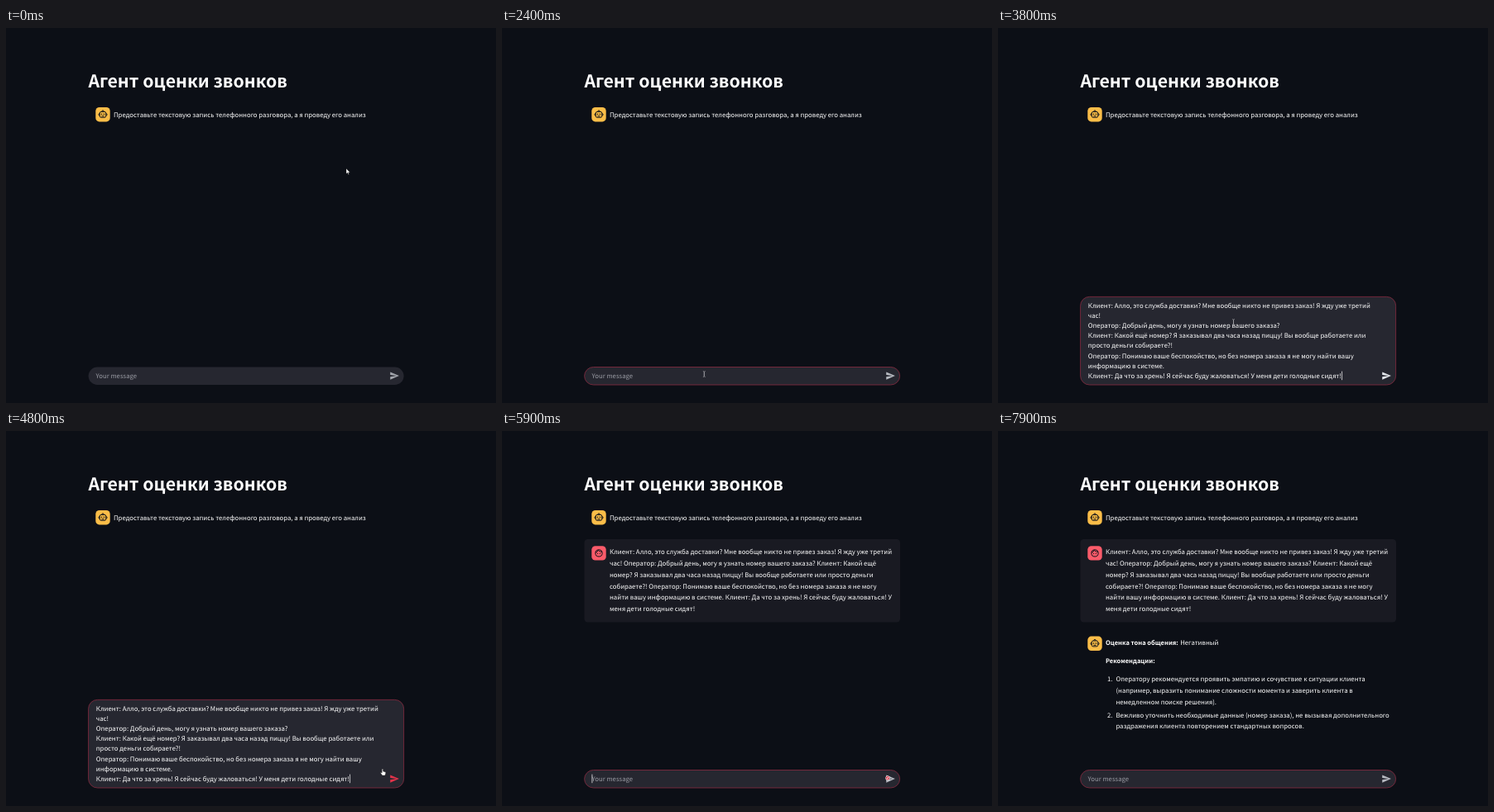
Write an HTML page that moves like this. It is 592 px wide and 454 px high and loops after 8 s.

```html
<!DOCTYPE html>
<html lang="ru">
<head>
<meta charset="utf-8">
<title>Агент оценки звонков</title>
<style>
  html, body { margin: 0; width: 100%; height: 100%; overflow: hidden; background: #0c0f16; }
  svg { display: block; width: 592px; height: 454px; }
  text { fill: #fff; text-rendering: geometricPrecision; white-space: pre; }
  .bold { font-weight: 600; }
</style>
</head>
<body>
<svg id="stage" viewBox="0 0 592 454">
  <defs>
    <g id="bot">
      <rect width="17.4" height="17.4" rx="4.4" fill="#fbbd48"/>
      <g fill="none" stroke="#11131a" stroke-width="1">
        <rect x="5" y="5.4" width="7.4" height="6.9" rx="1.6"/>
        <path d="M7.4 5.2a1.3 1.3 0 0 1 2.6 0M4.8 7.6a1.2 1.2 0 0 0 0 2.4M12.6 7.6a1.2 1.2 0 0 1 0 2.4M7 10.7h3.4"/>
      </g>
      <circle cx="7.3" cy="8.3" r=".75"/><circle cx="10.1" cy="8.3" r=".75"/>
    </g>
    <g id="face">
      <rect width="17.4" height="17.4" rx="4.4" fill="#fa5b6a"/>
      <g fill="none" stroke="#11131a" stroke-width="1">
        <circle cx="8.7" cy="8.7" r="4.1"/>
        <path d="M4.8 8.2Q7.3 7.3 8 4.9Q9.6 7.6 12.5 7.2"/>
      </g>
      <circle cx="7.3" cy="9.3" r=".6"/><circle cx="10.1" cy="9.3" r=".6"/>
    </g>
  </defs>

  <rect width="592" height="454" fill="#0c0f16"/>
  <text id="title" x="99.5" y="72.4" font-weight="700">Агент оценки звонков</text>
  <use href="#bot" x="108.3" y="96"/>
  <g id="hello"></g>

  <g id="request">
    <rect x="99.5" y="131" width="381.5" height="100.5" rx="4.2" fill="#191a22"/>
    <use href="#face" x="108.3" y="139.2"/>
  </g>

  <g id="wait">
    <circle cx="104" cy="247" r="3.7" fill="none" stroke="#2b2d36" stroke-width="1"/>
    <path id="spin" d="M106.6 244.4A3.7 3.7 0 1 1 101.4 244.4" fill="none" stroke="#d3d4d8" stroke-width="1"/>
    <circle cx="170.2" cy="246.8" r="4.2" fill="#f9c23c"/>
    <path d="M167.3 244.3l2-.6M171.3 243.7q1.3-.6 2.1.4M169.2 249.1l2.4-.6" fill="none" stroke="#5c3a1c" stroke-width=".7"/>
    <circle cx="168.6" cy="245.8" r=".65" fill="#4a2d1a"/><circle cx="172.2" cy="245.8" r=".65" fill="#4a2d1a"/>
    <path d="M166 248.2q1 0 1.3 1.2l2.8-.4q.7.5-.3.9l-1 .5q-.3 1.4-1.7 1.3q-1.6-.6-1.1-3.5z" fill="#e58b2b"/>
  </g>

  <g id="answer"><use href="#bot" x="108.3" y="248.6"/></g>

  <rect id="box" x="99.6" width="381" rx="10.9" fill="#262730" stroke="#7c2a3e" stroke-width=".9"/>
  <g id="draft"></g>
  <text id="hint" x="108.6" y="423.6" style="fill:#9a9ca4">Your message</text>
  <rect id="caret" y="415.6" width=".8" height="10.6" fill="#e3e3e6"/>
  <path id="send" d="M2 21L23 12 2 3v7l15 2-15 2z" transform="translate(463.2 415) scale(.51)"/>

  <g id="cursor">
    <path id="arrow" d="M0 0V6.6L1.6 5.2 2.6 7.5 3.6 7 2.6 4.9H4.7Z" fill="#fff" stroke="#000" stroke-width=".4"/>
    <path id="beam" d="M-1.4 -3.4Q0 -3.4 0 -2.4V2.4Q0 3.4 -1.4 3.4M1.4 -3.4Q0 -3.4 0 -2.4V2.4Q0 3.4 1.4 3.4" fill="none" stroke="#a6a6ab" stroke-width=".7"/>
    <path id="hand" d="M-.8 -2.6q.8-.8 1.4 0V0l2.6.8q.8.4.5 1.6L3 5H-.4L-2.6 1.8q.2-1 1.2-.4l.6.6z" fill="#fff" stroke="#111" stroke-width=".4"/>
    <g id="stop">
      <circle r="2.6" fill="#fff"/>
      <circle r="1.8" fill="#fff" stroke="#d42b40" stroke-width="1"/>
      <path d="M-1.3 -1.3L1.3 1.3" stroke="#d42b40" stroke-width="1"/>
    </g>
  </g>
</svg>
<script>
const $ = id => document.getElementById(id);
const LOOP = 8000, FRAME = 100;
const GREETING = 'Предоставьте текстовую запись телефонного разговора, а я проведу его анализ';
const LABEL = 'Оценка тона общения:';
const NARROW = '"Noto Sans CJK JP", "Noto Sans CJK SC", "Open Sans", sans-serif';
const PLAIN = '"Open Sans", "Noto Sans", sans-serif';

const pen = document.createElement('canvas').getContext('2d');
function measure(str, weight, family) {
  pen.font = `${weight} 100px ${family}`;
  return pen.measureText(str).width;
}
// Use the narrow face only where its Cyrillic is proportional.
const family = measure('ш', 400, NARROW) > measure('г', 400, NARROW) + 5 ? NARROW : PLAIN;
$('stage').style.fontFamily = family;

// One font size per style, from the width of a sample in that style.
const sizeFor = (sample, width, weight) => 100 * width / measure(sample, weight, family);
const body = sizeFor(GREETING, 305, 400);
const bold = sizeFor(LABEL, 88, 600);
$('title').setAttribute('font-size', sizeFor('Агент оценки звонков', 240.5, 700));
$('hint').setAttribute('font-size', sizeFor('Your message', 49.5, 400));

function write(group, x, y, str, strong) {
  const el = document.createElementNS('http://www.w3.org/2000/svg', 'text');
  el.setAttribute('x', x);
  el.setAttribute('y', y);
  el.setAttribute('font-size', strong ? bold : body);
  if (strong) el.setAttribute('class', 'bold');
  el.textContent = str;
  $(group).appendChild(el);
  return el;
}
function writeLines(group, x, y, step, lines) {
  return lines.map((s, i) => write(group, x, y + step * i, s)).pop();
}

write('hello', 130, 107.6, GREETING);
writeLines('request', 130, 149.1, 13.84, [
  'Клиент: Алло, это служба доставки? Мне вообще никто не привез заказ! Я жду уже третий',
  'час! Оператор: Добрый день, могу я узнать номер вашего заказа? Клиент: Какой ещё',
  'номер? Я заказывал два часа назад пиццу! Вы вообще работаете или просто деньги',
  'собираете?! Оператор: Понимаю ваше беспокойство, но без номера заказа я не могу',
  'найти вашу информацию в системе. Клиент: Да что за хрень! Я сейчас буду жаловаться! У',
  'меня дети голодные сидят!'
]);
const lastLine = writeLines('draft', 108.8, 338.8, 12.14, [
  'Клиент: Алло, это служба доставки? Мне вообще никто не привез заказ! Я жду уже третий',
  'час!',
  'Оператор: Добрый день, могу я узнать номер вашего заказа?',
  'Клиент: Какой ещё номер? Я заказывал два часа назад пиццу! Вы вообще работаете или',
  'просто деньги собираете?!',
  'Оператор: Понимаю ваше беспокойство, но без номера заказа я не могу найти вашу',
  'информацию в системе.',
  'Клиент: Да что за хрень! Я сейчас буду жаловаться! У меня дети голодные сидят!'
]);
write('wait', 114.6, 249.9, 'Анализирую');
write('answer', 130, 258.6, LABEL, true);
write('answer', 220.2, 258.6, 'Негативный');
write('answer', 130, 281, 'Рекомендации:', true);
write('answer', 132, 303.3, '1.');
writeLines('answer', 142.4, 303.3, 13.84, [
  'Оператору рекомендуется проявить эмпатию и сочувствие к ситуации клиента',
  '(например, выразить понимание сложности момента и заверить клиента в',
  'немедленном поиске решения).'
]);
write('answer', 132, 346.6, '2.');
writeLines('answer', 142.4, 346.6, 13.84, [
  'Вежливо уточнить необходимые данные (номер заказа), не вызывая дополнительного',
  'раздражения клиента повторением стандартных вопросов.'
]);
const draftEnd = 109.2 + lastLine.getComputedTextLength();

// time, x, y, pointer shape
const PATH = [
  [0, 411, 170, 'arrow'], [200, 470, 300, 'arrow'], [400, 300, 405, 'arrow'],
  [600, 122, 200, 'arrow'], [700, 200, 27, 'arrow'], [900, 402, 106, 'arrow'],
  [1400, 248, 412, 'beam'], [1500, 244.3, 419, 'beam'], [2900, 244.3, 419, 'beam'],
  [3500, 248, 347, 'beam'], [3600, 248, 347, 'beam'], [3800, 284.5, 356, 'beam'],
  [4200, 287.5, 372, 'beam'], [4300, 287.5, 372, 'beam'], [4800, 455, 412, 'hand'],
  [5000, 480, 423, 'hand'], [5200, 467, 421, 'hand'], [5800, 466, 420.2, 'stop'],
  [6200, 466, 420.2, 'stop'], [6500, 464.6, 417.6, 'stop'], [8000, 464.6, 417.6, 'stop']
];
const SHAPES = ['arrow', 'beam', 'hand', 'stop'];
const CARET_ON = [[2100, 2400], [2600, 3100], [3700, 4200], [4700, 5300], [5900, 6400], [6900, 7400]];

const show = (id, on) => $(id).setAttribute('visibility', on ? 'inherit' : 'hidden');
const within = (t, a, b) => t >= a && t < b;

function pointer(t) {
  let i = 0;
  while (i < PATH.length - 2 && t >= PATH[i + 1][0]) i++;
  const [t0, x0, y0, shape] = PATH[i], [t1, x1, y1] = PATH[i + 1];
  const k = (t - t0) / (t1 - t0), e = k * k * (3 - 2 * k);
  $('cursor').setAttribute('transform', `translate(${x0 + (x1 - x0) * e} ${y0 + (y1 - y0) * e})`);
  SHAPES.forEach(s => show(s, s === shape));
}

function sendColor(t, typed) {
  if (within(t, 4800, 5900)) return '#e0334a';
  if (typed) return '#e2e5ea';
  return t < 2100 ? '#a2a5ac' : '#b6b9c0';
}

function draw(t) {
  const typed = within(t, 2600, 5900), answered = t >= 7800;
  const top = typed ? 325.4 : 410.5;
  $('box').setAttribute('y', top);
  $('box').setAttribute('height', 432 - top);
  $('box').setAttribute('stroke-opacity', t < 2100 ? 0 : t < 2200 ? 0.6 : 1);
  show('draft', typed);
  show('hint', !typed);
  show('request', t >= 5900);
  show('wait', t >= 6300 && !answered);
  show('answer', answered);
  show('caret', CARET_ON.some(([a, b]) => within(t, a, b)));
  $('caret').setAttribute('x', typed ? draftEnd : 108.5);
  $('send').setAttribute('fill', sendColor(t, typed));
  $('spin').setAttribute('transform', `rotate(${(t - 6900) * 0.36} 104 247)`);
  show('cursor', !answered);
  pointer(t);
}

const start = performance.now();
function tick() {
  const t = (performance.now() - start) % LOOP;
  draw(Math.floor(t / FRAME) * FRAME);
  requestAnimationFrame(tick);
}
draw(0);
requestAnimationFrame(tick);
</script>
</body>
</html>
```
